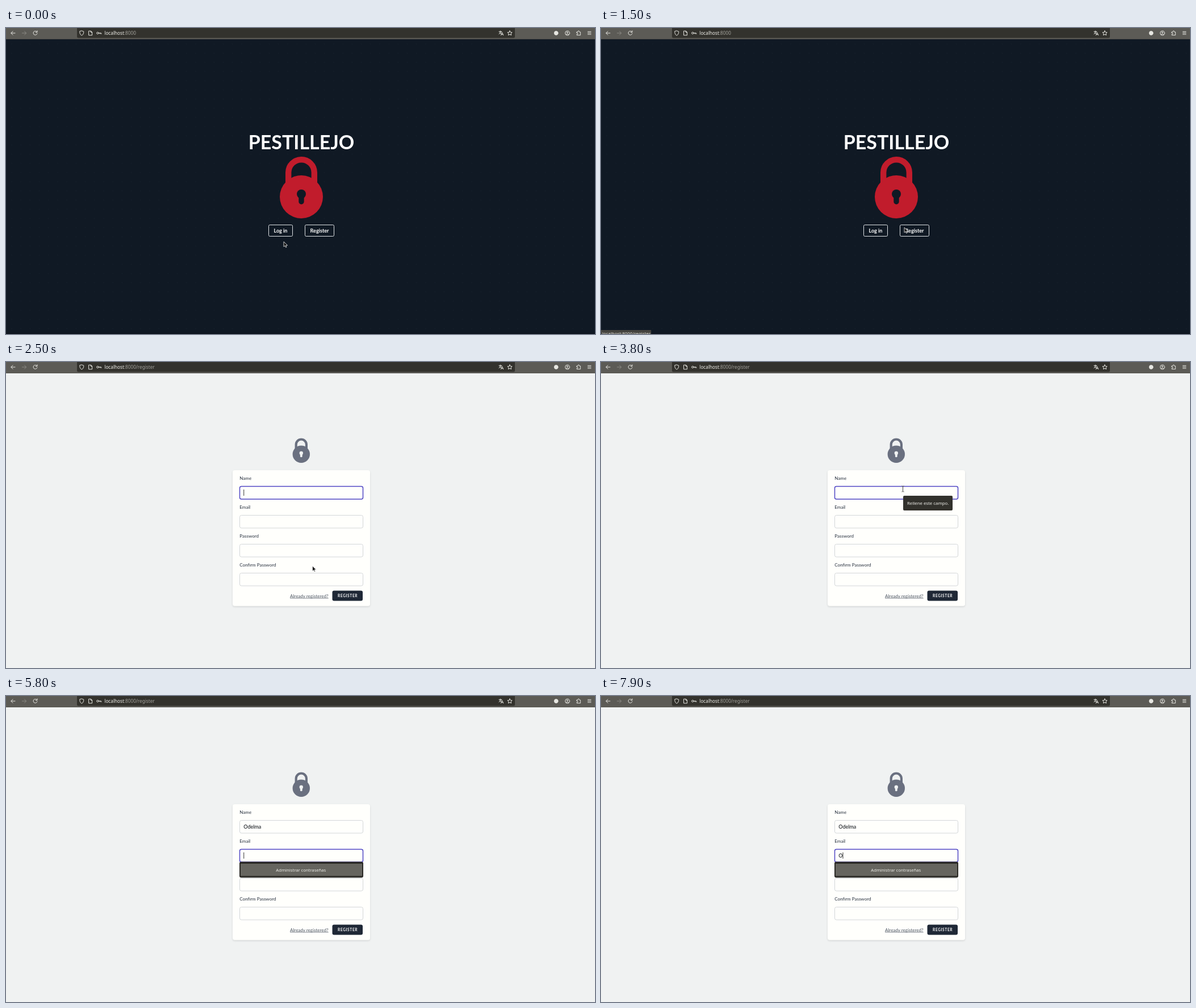
An HTML page for the animation above (8000 ms loop, 1037 by 540 pixels).

```html
<!DOCTYPE html>
<html lang="es">
<head>
<meta charset="utf-8">
<title>Register</title>
<style>
  html, body { margin: 0; width: 100%; height: 100%; overflow: hidden; background: #f0f2f2; }
  svg { display: block; }
  text { font-family: Lato, "Open Sans", sans-serif; white-space: pre; }
  .ui { font-family: "Noto Sans", sans-serif; }
  .mid { text-anchor: middle; }
  .icons { fill: none; stroke: #e6e6e1; stroke-width: 1; stroke-linecap: round; stroke-linejoin: round; }
  .btn rect { fill: none; stroke: #dfe2e5; rx: 2px; }
  .btn text { font-size: 9px; font-weight: 700; fill: #fff; }
  .btn.hot rect { fill: #dc3143; stroke: #dc3143; }
  .label { font-size: 8px; font-weight: 500; fill: #38404d; }
  .field { fill: #fffffc; stroke: #d3d6d9; }
  .field.focus { stroke: #4f46c4; stroke-width: 1.5; }
  .value { font-size: 9px; font-weight: 500; fill: #15191f; }
</style>
</head>
<body>
<svg width="1037" height="540" viewBox="0 0 1037 540">
  <defs>
    <pattern id="dots" width="16.2" height="16.2" patternUnits="userSpaceOnUse" x="2" y="4">
      <circle cx="8" cy="8" r=".7" fill="#17212d"/>
    </pattern>
    <filter id="shadow" x="-5%" y="-5%" width="110%" height="112%">
      <feDropShadow dx="0" dy="1.5" stdDeviation="1.5" flood-opacity=".13"/>
    </filter>
    <g id="lock">
      <path d="M497.2 276V255a22.8 22.8 0 0 1 45.6 0V276" fill="none" stroke="currentColor" stroke-width="10.4"/>
      <circle cx="520" cy="298" r="38" fill="currentColor"/>
      <circle cx="520" cy="293" r="8"/>
      <path d="M515.3 296h9.4v10.5a4.7 4.7 0 0 1-9.4 0z"/>
    </g>
  </defs>

  <g id="welcome">
    <rect width="1037" height="540" fill="#101924"/>
    <rect width="1037" height="540" fill="url(#dots)"/>
    <rect y="538" width="1037" height="2" fill="#0d141e"/>
    <text class="mid" x="520" y="214" font-size="34" font-weight="700" fill="#fff">PESTILLEJO</text>
    <use href="#lock" color="#c11c2c" fill="#101924"/>
    <g class="btn" id="login">
      <rect x="462.5" y="347.5" width="42" height="20"/>
      <text class="mid" x="483.5" y="360.7">Log in</text>
    </g>
    <g class="btn" id="register">
      <rect x="526.5" y="347.5" width="51" height="20"/>
      <text class="mid" x="552" y="360.7">Register</text>
    </g>
    <g id="status">
      <rect id="statusBox" y="533" height="7" fill="#45443f"/>
      <text id="statusText" class="ui" x="2" y="542" font-size="7.9" fill="#e4e4df"></text>
    </g>
  </g>

  <g id="signup">
    <rect width="1037" height="540" fill="#f0f2f2"/>
    <use href="#lock" color="#6a7080" fill="#f0f2f2" transform="translate(311.8 43.6) scale(.4)"/>
    <rect x="399" y="191" width="242" height="239.5" rx="4" fill="#fffffc" filter="url(#shadow)"/>
    <g id="form"></g>
    <text class="label" x="500" y="415.5" font-size="7.9" style="fill:#5a626e;text-decoration:underline">Already registered?</text>
    <rect x="574.5" y="403.5" width="53.5" height="18" rx="3" fill="#1f2836"/>
    <text class="mid" x="601.6" y="415" font-size="6.5" font-weight="700" letter-spacing=".65" fill="#fff">REGISTER</text>
    <rect id="caret" width=".9" height="11" fill="#222"/>
    <g id="tip">
      <rect x="532" y="236" width="87" height="26" rx="2" fill="#32312c"/>
      <text class="ui" x="539" y="251.6" font-size="7.8" fill="#f1f1ec">Rellene este campo.</text>
    </g>
    <g id="menu">
      <rect x="411" y="292.5" width="218" height="28" rx="3" fill="#2c2b27"/>
      <rect x="413" y="296" width="214" height="21.5" fill="#66655f"/>
      <text class="ui mid" x="519.3" y="309.6" font-size="7.65" fill="#ecece7">Administrar contraseñas</text>
    </g>
  </g>

  <rect width="1037" height="19.7" fill="#5c5b56"/>
  <rect y="19" width="1037" height=".8" fill="#4f4e49"/>
  <rect x="125" y="-3" width="771" height="20.5" rx="2.5" fill="#33322d"/>
  <text class="ui" x="173.3" y="12" font-size="8.2" fill="#a2a19b"><tspan fill="#f2f2ed">localhost</tspan>:8000<tspan id="path"></tspan></text>
  <g class="icons">
    <path d="M16 9H9M12 5.8L8.8 9l3.2 3.2"/>
    <path d="M28.500 9h7M32.500 5.800l3.200 3.200-3.200 3.200" stroke="#8b8a84"/>
    <path d="M54.400 6.800a3.500 3.500 0 1 0 .6 2.800M55 4.800v2.700h-2.700"/>
    <path d="M133.300 5l3.500 1.200c0 3.700-1 5.700-3.500 7-2.500-1.300-3.500-3.300-3.500-7z"/>
    <path d="M146 5.300h3.600l2 2v5.500h-5.600zM149.400 5.400v2.200h2.200"/>
    <path d="M163.200 9h4.500v1.500M165.600 9v1.200"/><circle cx="161.400" cy="9" r="1.700"/>
    <path d="M868 6.300h4.800M870.400 5.200v1.100M872 6.400q-1 3-4 4.200M869 7.600q1 1.600 2.600 2.300M871.500 12.800l2-5 2 5M872.200 11.300h2.700"/>
    <path d="M887 4.900l1.200 2.600 2.900.3-2.100 2 .6 2.900-2.600-1.400-2.600 1.400.6-2.900-2.100-2 2.900-.3z"/>
    <circle cx="968.600" cy="9" r="3.400" fill="#e6e6e1"/>
    <circle cx="988.400" cy="9" r="3.900"/><circle cx="988.400" cy="7.900" r="1.100"/><path d="M986.200 11.400q2.200-1.700 4.400 0"/>
    <path d="M1005 7h1.900V6.200a1.200 1.200 0 0 1 2.400 0V7h2v5.600h-6.300v-1.700h.7a1.100 1.100 0 0 0 0-2.200h-.7z"/>
    <path d="M1024.300 6.400h5.600M1024.300 8.800h5.600M1024.300 11.200h5.600"/>
  </g>

  <g id="cursor" stroke-linejoin="round">
    <path id="arrow" d="M0 0V9L2.200 7.200 3.600 10.200 5 9.600 3.700 6.700 6.500 6.500z" fill="#181818" stroke="#eee" stroke-width=".8"/>
    <path id="hand" d="M-.9-1.500q.9-.9 1.700 0V2l3.200.7q1 .4.800 1.500l-.7 3.800H-.7L-3 4.600q-.2-1 .8-.9l1.300.8z" fill="#fff" stroke="#222" stroke-width=".6"/>
    <path id="beam" d="M-2-5q1.500 0 2 .7.500-.7 2-.7M0-4.300v8.600M-2 5q1.500 0 2-.7.500.7 2 .7" fill="none" stroke="#444"/>
  </g>
</svg>
<script>
const LOOP = 8000, PAGE_SWITCH = 2500, EMAIL_FOCUS = 5600;
const $ = id => document.getElementById(id);
const show = (id, on) => $(id).style.display = on ? '' : 'none';

const rows = ['Name', 'Email', 'Password', 'Confirm Password'];
$('form').innerHTML = rows.map((label, i) => {
  const y = 51 * i;
  return `<text class="label" x="411.3" y="${207.6 + y}">${label}</text>
    <rect class="field" x="411.5" y="${219.5 + y}" width="217" height="22.5" rx="3"/>
    <text class="value" x="418.3" y="${234 + y}"></text>`;
}).join('');
const fields = document.querySelectorAll('.field');
const values = document.querySelectorAll('.value');

// Pointer poses, each held until the next: time, x, y, shape
const poses = [
  [0, 489, 377, 'arrow'], [100, 487, 370, 'arrow'], [200, 486, 363, 'hand'],
  [300, 490, 360, 'hand'], [400, 500, 358, 'hand'], [500, 514, 356, 'arrow'],
  [600, 530, 357, 'hand'], [700, 540, 358, 'hand'], [800, 545, 357, 'hand'],
  [1100, 544, 335, 'arrow'], [1300, 541, 341, 'arrow'], [1400, 538, 347, 'arrow'],
  [1500, 534, 352, 'arrow'], [1600, 503, 360, 'hand'], [1800, 496, 362, 'hand'],
  [1900, 490, 364, 'hand'], [2100, 512, 362, 'arrow'], [2200, 531, 361, 'hand'],
  [2300, 540, 361, 'hand'], [2500, 539.5, 360, 'arrow'], [2600, 540, 338, 'arrow'],
  [2700, 537, 290, 'arrow'], [2800, 530, 240, 'arrow'], [2900, 523, 206, 'arrow'],
  [3100, 525, 209, 'arrow'], [3200, 528, 214, 'arrow'], [3300, 531.5, 224, 'beam'],
];
const name = 'Odelma';
const keyTimes = [4400, 4600, 4800, 5000, 5100, 5200];
const within = (t, from, to) => t >= from && t < to;
const target = pose => pose[1] < 516 ? 'login' : 'register';

function drawWelcome(past, pose) {
  const hot = pose[3] === 'hand' ? target(pose) : '';
  for (const id of ['login', 'register']) $(id).classList.toggle('hot', id === hot);
  // The status line keeps the last hovered link
  const last = past.findLast(p => p[3] === 'hand');
  show('status', last);
  if (!last) return;
  $('statusText').textContent = 'localhost:8000/' + target(last);
  $('statusBox').setAttribute('width', $('statusText').getComputedTextLength() + 3);
}

function drawSignup(t) {
  const active = t < EMAIL_FOCUS ? 0 : 1;
  fields.forEach((f, i) => f.classList.toggle('focus', i === active));
  values[0].textContent = name.slice(0, keyTimes.filter(k => t >= k).length);
  values[1].textContent = name.slice(0, t < 7100 ? 0 : within(t, 7600, 7900) ? 2 : 1);
  const text = values[active].textContent;
  const width = text ? values[active].getComputedTextLength() : 0;
  $('caret').setAttribute('x', 418.3 + width);
  $('caret').setAttribute('y', 225 + 51 * active);
  show('caret', !within(t, 3800, 4400) && !within(t, 6800, 7100));
  show('tip', within(t, 3800, 4400));
  show('menu', t >= 5800);
}

function draw(now) {
  const t = now % LOOP, onWelcome = t < PAGE_SWITCH;
  const past = poses.filter(p => p[0] <= t), pose = past.at(-1);
  show('welcome', onWelcome);
  show('signup', !onWelcome);
  $('path').textContent = onWelcome ? '' : '/register';
  if (onWelcome) drawWelcome(past, pose);
  else drawSignup(t);

  show('cursor', t < 4400);
  $('cursor').setAttribute('transform', `translate(${pose[1]} ${pose[2]})`);
  for (const id of ['arrow', 'hand', 'beam']) show(id, id === pose[3]);
}

const start = performance.now();
function tick() {
  draw(performance.now() - start);
  requestAnimationFrame(tick);
}
tick();
</script>
</body>
</html>
```
